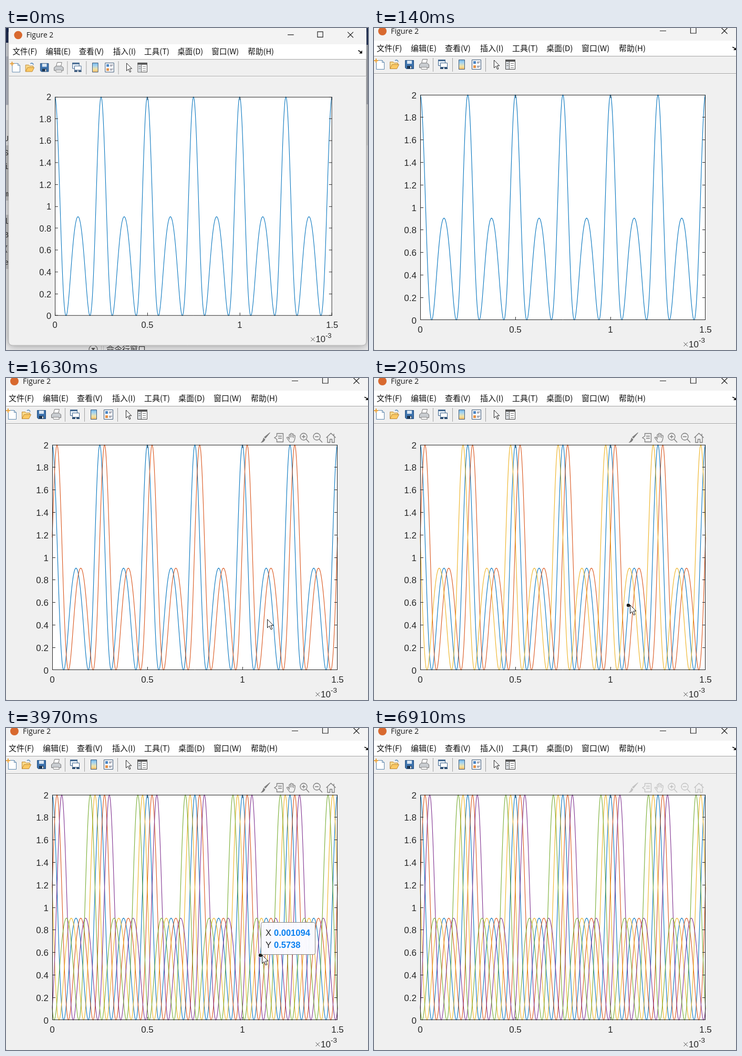
An HTML page with a canvas for the animation above (7050 ms loop, 689x612 px).

```html
<!DOCTYPE html>
<html lang="zh">
<head>
<meta charset="utf-8">
<style>
html, body { margin: 0; width: 689px; height: 612px; overflow: hidden; }
canvas { display: block; }
</style>
</head>
<body>
<canvas id="stage" width="689" height="612"></canvas>
<script>
const ctx = document.getElementById('stage').getContext('2d');
const LOOP = 7050, STEP = 70;
const INK = '#262626';
const HAN = '"Noto Sans CJK SC", "Noto Sans CJK", sans-serif';
const ARIAL = '"Liberation Sans", Arial, sans-serif';
const AX = { x: 88, y: 127, w: 543, h: 428 };

// Each curve: time of appearance, shift in ms, colour
const CURVES = [
  [0, 0, '#0072BD'],
  [930, 0.025, '#D95319'],
  [1980, -0.025, '#EDB120'],
  [2980, 0.05, '#7E2F8E'],
  [3970, -0.05, '#77AC30']
];

const rect = (color, x, y, w, h) => { ctx.fillStyle = color; ctx.fillRect(x, y, w, h); };
const fill = (d, color) => { ctx.fillStyle = color; ctx.fill(new Path2D(d)); };
const stroke = (d, color, width = 1) => {
  ctx.strokeStyle = color;
  ctx.lineWidth = width;
  ctx.stroke(new Path2D(d));
};
const shape = (d, inside, edge, width) => { fill(d, inside); stroke(d, edge, width); };
const text = (s, x, y, font, color = INK, align = 'left') => {
  ctx.font = font;
  ctx.fillStyle = color;
  ctx.textAlign = align;
  ctx.fillText(s, x, y);
};
const disc = (color, x, y, r) => {
  ctx.fillStyle = color;
  ctx.beginPath();
  ctx.arc(x, y, r, 0, 7);
  ctx.fill();
};

function drawDesktop() {
  rect('#e9e9ea', 0, 0, 689, 612);
  rect('#1d2b52', 0, 0, 6, 28);
  rect('#d5d8de', 0, 28, 6, 26);
  rect('#b9bdc8', 0, 54, 6, 92);
  rect('#f6f6f6', 0, 147, 6, 28);
  rect('#c6c6c6', 0, 223, 6, 105);
  rect('#c6c6c6', 0, 355, 6, 103);
  rect('#26375f', 684, 0, 5, 32);
  rect('#a9adb5', 684, 32, 5, 113);
  rect('#dcdcdc', 684, 145, 5, 78);
  [['U', 215], ['S', 242], ['i', 268], ['m', 320], ['l', 372], ['B', 398], ['(', 424], ['e', 450]]
    .forEach(([s, y]) => text(s, 5, y, '15px "Liberation Mono", monospace', '#333', 'right'));
  stroke('M174 611a8 8 0 1 0 -16 0a8 8 0 1 0 16 0', '#666', 1.2);
  fill('M162 608h8l-4 5z', '#555');
  stroke('M181.5 604v8M185.5 604v8', '#c4c4c4');
  text('命令行窗口', 191, 616, '15px ' + HAN, '#333');
}

function drawToolbar() {
  // new, open, save, print
  shape('M4.5 61.5h11l4 4v13h-15z', '#fff', '#5d86ad');
  stroke('M15.5 61.5v4h4', '#5d86ad');
  stroke('M4 58v8M0 62h8', '#e9a13a', 2);
  shape('M30.5 77.5v-13h6l2 2h7v3', '#f7d88a', '#c08a35');
  shape('M30.5 77.5l4 -8h13l-4 8z', '#fbc964', '#c08a35');
  stroke('M40 62c3 -2 5 -1 6 2', '#4d83b8', 1.5);
  shape('M59.5 61.5h16v16h-14l-2 -2z', '#3f74ae', '#264f7d');
  rect('#dce8f4', 63, 62, 9, 6);
  rect('#1d3550', 63, 72, 9, 5);
  rect('#eee', 69, 73, 2, 4);
  shape('M90.5 67.5l2 -8h9l-2 8', '#fff', '#777');
  shape('M86.5 69.5l4 -3h10l4 3v6h-18z', '#c8ccd0', '#777');
  shape('M89.5 74.5h11l1 4h-11z', '#f4f4f4', '#888');
  // link
  shape('M122.5 60.5h13v11h-13z', '#e8f0f8', '#42678f');
  rect('#42678f', 122, 60, 14, 3);
  shape('M126.5 66.5h13v8h-13z', '#fff', '#42678f');
  stroke('M126 76.5h6M134 76.5h6', '#2e4f74', 3);
  // colour bar, legend
  const ramp = ctx.createLinearGradient(0, 60, 0, 79);
  ['#6fb4e8', '#a9d5ee', '#f3e3a5', '#f5b85c'].forEach((c, i) => ramp.addColorStop(i / 3, c));
  shape('M161.5 60.5h11v18h-11z', ramp, '#3c5878');
  shape('M186.5 60.5h17v18h-17z', '#f8fafc', '#3c5878');
  rect('#4b86c4', 189, 63, 5, 5);
  rect('#e59045', 189, 71, 5, 5);
  stroke('M196 64.5h6M196 66.5h4M196 72.5h6M196 74.5h4', '#667');
  // pointer, properties
  shape('M228.5 61v15l3.5 -3.5l2.8 6l2.2 -1l-2.8 -5.8h4.6z', '#fff', '#222');
  shape('M250.5 60.5h18v18h-18z', '#fff', '#444');
  rect('#555', 250, 60, 19, 4);
  rect('#d8dce0', 251, 64, 6, 14);
  stroke('M257.5 64v14', '#555');
  stroke('M260 67.5h6M260 71.5h6M260 75.5h6M252 67.5h4M252 71.5h4', '#777');
  stroke('M112.5 57v26M149.5 57v26M212.5 57v26', '#a0a0a0');
}

function drawFrame() {
  ctx.save();
  ctx.shadowColor = 'rgba(0,0,0,.4)';
  ctx.shadowBlur = 16;
  ctx.fillStyle = '#f0f0f0';
  ctx.beginPath();
  ctx.roundRect(-2.7, -20, 701, 633, 8);
  ctx.fill();
  ctx.restore();
  stroke('M-2.7 0V605q0 8 8 8H690q8 0 8 -8V0', '#b4b4b4');
  rect('#f3f3f3', -2, -20, 700, 44);
  rect('#fff', -2, 24, 700, 30);
  disc('#d8692f', 16, 6, 8);
  text('Figure 2', 32, 11, '14.3px "Open Sans", sans-serif', '#1a1a1a');
  stroke('M544 5.5h12M602.5 -.5h10.5v10.5h-10.5zM661.5 0l11 11M672.5 0l-11 11', '#222', 1.2);
  ['文件(F)', '编辑(E)', '查看(V)', '插入(I)', '工具(T)', '桌面(D)', '窗口(W)', '帮助(H)']
    .forEach((s, i) => text(s, [5, 70, 135, 202, 263, 328, 395, 466][i], 44, '15px ' + HAN, '#111'));
  stroke('M682 36.5q3 0 6 4', '#111', 1.6);
  fill('M690 36v6h-6z', '#111');
  rect('#a3a3a3', -2, 53, 700, 1);
  rect('#a3a3a3', -2, 86, 700, 1);
  rect('#fafafa', -2, 87, 700, 1);
  drawToolbar();
}

// x in ms, period 0.25 ms
function wave(x) {
  const c = Math.cos(8 * Math.PI * x);
  return (-0.0675 + 1.1827 * c + 0.299 * c * c) ** 2;
}

function drawPlot(t) {
  const { x, y, w, h } = AX;
  const right = x + w, bottom = y + h;
  rect('#fff', x, y, w, h);
  for (const [start, shift, color] of CURVES) {
    if (t < start) continue;
    ctx.beginPath();
    for (let p = 0; p <= w; p += 0.5)
      ctx.lineTo(x + p, bottom - wave(p / w * 1.5 - shift) * h / 2);
    ctx.strokeStyle = color;
    ctx.lineWidth = 1.1;
    ctx.stroke();
  }
  // box and ticks sit on whole pixels inside the axes
  stroke(`M${x + 0.5} ${y + 0.5}h${w - 1}v${h - 1}h${1 - w}z`, INK);
  const font = '17px ' + ARIAL;
  for (let i = 0; i <= 10; i++) {
    const pos = bottom - i * h / 10;
    const ty = Math.min(Math.floor(pos), bottom - 1) + 0.5;
    stroke(`M${x} ${ty}h6M${right} ${ty}h-6`, INK);
    text(String(i / 5), 81, pos + 6.5, font, INK, 'right');
  }
  for (let i = 0; i <= 3; i++) {
    const pos = x + i * w / 3;
    const tx = Math.min(Math.floor(pos), right - 1) + 0.5;
    stroke(`M${tx} ${y}v6M${tx} ${bottom}v-6`, INK);
    text(String(i / 2), pos, 579, font, INK, 'center');
  }
  stroke('M589.5 597.5l7.5 7.5M597 597.5l-7.5 7.5', '#555');
  text('10', 599, 607, font);
  text('-3', 618, 598, '13.5px ' + ARIAL);
}

function drawAxesTools(alpha) {
  const gray = '#7c7c7c';
  ctx.globalAlpha = alpha;
  fill('M503 104l-9 11l-3 -2.5l11 -9zM490 113.5l3.5 3q-2 6 -9 6.5q4 -3 5.5 -9.5z', gray);
  stroke('M515.5 105.5h12v16h-12v-5l-4.5 -3l4.5 -3zM518 110.5h7M518 114.5h7', gray, 1.3);
  stroke('M539 116v-8q1.5 -2 2.5 0v5v-7q1.5 -2 3 0v7v-6q1.5 -2 2.8 0v7v-4q2 -2 3 0q0 7 -3 12h-7q-3 -4 -6 -8.5q1 -2 3 -.5z', gray, 1.2);
  for (const x of [566.5, 591.5])
    stroke(`M${x + 6.5} 111.5a6.5 6.5 0 1 0 -13 0a6.5 6.5 0 1 0 13 0M${x + 4.5} 116l6 6.5M${x - 3.5} 111.5h7`, gray, 1.3);
  stroke('M566.5 108v7', gray, 1.3);
  stroke('M609.5 113.5l9 -8.5l9 8.5M612 112v10.5h4.5v-6h4v6h4.5v-10.5M624 110v-4', gray, 1.3);
  ctx.globalAlpha = 1;
}

function drawTip() {
  ctx.beginPath();
  ctx.roundRect(485.5, 369.5, 103, 61, 3);
  ctx.fillStyle = 'rgba(250,250,255,.97)';
  ctx.strokeStyle = '#858585';
  ctx.lineWidth = 1;
  ctx.fill();
  ctx.stroke();
  [['X', '0.001094', 395], ['Y', '0.5738', 418]].forEach(([name, value, y]) => {
    text(name, 494, y, '16.5px ' + ARIAL);
    text(value, 510, y, 'bold 16.5px ' + ARIAL, '#0a80f0');
  });
}

function drawPointer(t) {
  if (t < 1350 || t >= 6630) return;
  let x = 487, y = 431;
  if (t < 1910) {
    const left = (1 - (t - 1350) / 560) ** 2;
    x += 35 * left;
    y += 95 * left;
  } else if (t >= 6280) {
    x = 491;
    y = 457 + (t - 6280) / 2;
  }
  ctx.save();
  ctx.translate(x + 0.5, y + 0.5);
  shape('M0 0v16l3.7 -3.5l3 6.7l2.7 -1.2l-3 -6.5h5z', '#fff', '#111');
  ctx.restore();
}

function draw() {
  const now = performance.now() % LOOP;
  const t = Math.floor(now / STEP + 1e-6) * STEP;
  // window opening: scale and offset
  const [scale, dx, dy] = now < 70 ? [0.9715, 7.6, 7.6] : now < 140 ? [0.994, 1.5, 1.7] : [1, 0, 0];
  drawDesktop();
  ctx.save();
  ctx.translate(dx, dy);
  ctx.scale(scale, scale);
  drawFrame();
  drawPlot(now);
  ctx.restore();
  if (now >= 1350) drawAxesTools(now >= 6770 ? 0.4 : Math.min(1, (now - 1280) / 280));
  if (now >= 1910 && now < 6490) {
    disc('#fff', 484, 432, 4);
    disc('#1c1c1c', 484, 432, 3.2);
  }
  if (now >= 2780 && now < 6490) drawTip();
  drawPointer(t);
  requestAnimationFrame(draw);
}
draw();
</script>
</body>
</html>
```
